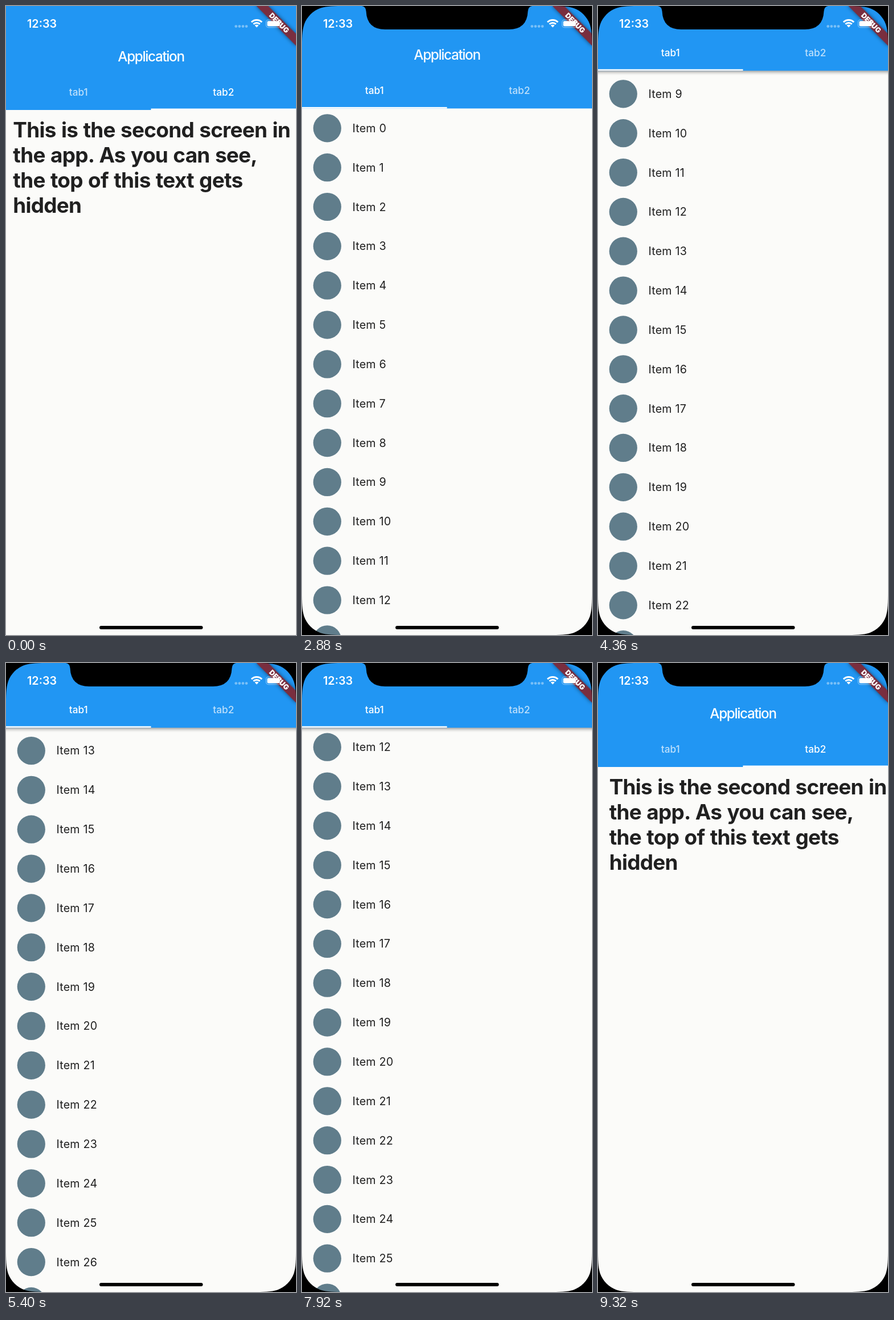
An HTML page for the animation above (9360 ms loop, 509 px wide and 1101 px high).

```html
<!DOCTYPE html>
<html lang="en">
<head>
<meta charset="utf-8">
<title>Tabbed application</title>
<style>
  html, body { margin: 0; width: 100%; height: 100%; overflow: hidden; background: #fbfbf9; }
  svg { display: block; width: 100%; height: 100%; }
  text { font-family: Inter, "Noto Sans", sans-serif; font-optical-sizing: none; fill: #fff; }
  .mid { text-anchor: middle; }
  #list text { font-size: 19.67px; letter-spacing: .2px; fill: #202020; }
  #list circle { fill: #607d8b; }
  #article text { font-size: 36.9px; font-weight: 700; letter-spacing: -.73px; word-spacing: 1.3px; fill: #202020; }
  #title { font-size: 24.2px; font-weight: 500; letter-spacing: -1.3px; }
  .tab { font-size: 17.2px; font-weight: 500; }
  .clock { font-size: 19.8px; font-weight: 600; }
  .debug { font-size: 12.5px; font-weight: 900; }
  #shadow { filter: drop-shadow(0 2px 3px rgba(0, 0, 0, .45)); }
  .ribbon { filter: drop-shadow(0 0 3.5px rgba(0, 0, 0, .5)); }
</style>
</head>
<body>
<svg viewBox="0 0 509 1101" preserveAspectRatio="none">
  <rect width="509" height="1101" fill="#fbfbf9"/>
  <g id="list"></g>
  <g id="article"></g>

  <g id="header">
    <rect id="shadow" x="-20" y="-100" width="549" height="282" fill="#2196f3"/>
    <rect y="-100" width="509" height="282" fill="#2196f3"/>
    <text id="title" class="mid" x="254.5" y="97">Application</text>
    <text class="tab mid" x="127.2" y="156.5">tab1</text>
    <text class="tab mid" x="381.8" y="156.5">tab2</text>
    <rect id="indicator" y="179.5" width="254.5" height="2.5" fill="#fff"/>
  </g>

  <g transform="translate(509 0) rotate(45)">
    <rect class="ribbon" x="-49.2" y="34.4" width="98.4" height="14.8" fill="#792e3f"/>
    <text class="debug mid" y="46.3">DEBUG</text>
  </g>

  <g id="status" fill="#fff">
    <text class="clock" x="37" y="38">12:33</text>
    <g opacity=".4">
      <circle cx="403.7" cy="35.6" r="2.4"/><circle cx="409.8" cy="35.6" r="2.4"/>
      <circle cx="415.9" cy="35.6" r="2.4"/><circle cx="422" cy="35.6" r="2.4"/>
      <rect x="456.5" y="24.2" width="27" height="13.4" rx="4" fill="none" stroke="#fff" stroke-width="1.2"/>
      <path d="M485 29q2.5 2 0 4.5z"/>
    </g>
    <path d="M430.8 28.3a13 13 0 0 1 18.4 0M434.3 31.8a8 8 0 0 1 11.4 0" fill="none" stroke="#fff" stroke-width="3"/>
    <path d="M440 37.5l-3.4-3.4a4.8 4.8 0 0 1 6.8 0z"/>
    <rect x="458.5" y="26.2" width="22" height="9.4" rx="2.3"/>
  </g>

  <rect x="164" y="1085" width="181.5" height="6" rx="3"/>
  <g id="bezel">
    <path d="M105 0Q112 1 112.5 9Q114 41 146 41H363Q395 41 396.5 9Q397 1 404 0z"/>
    <path id="corner" d="M0 0V78C0 55.5 0 44.3 3.8 32.2C8.6 19 19 8.6 32.2 3.8C44.3 0 55.5 0 78 0z"/>
    <use href="#corner" transform="translate(509 0) scale(-1 1)"/>
    <use href="#corner" transform="translate(0 1101) scale(1 -1)"/>
    <use href="#corner" transform="translate(509 1101) scale(-1 -1)"/>
  </g>
</svg>
<script>
const LOOP = 9360, STEP = 40, WIDTH = 509;
const ROW = 68.85;       // list row height, also the collapsible part of the header
const HEADER = 182;
const $ = id => document.getElementById(id);
const tabs = document.querySelectorAll('.tab');

$('list').innerHTML = Array.from({ length: 40 }, (_, i) => {
  const y = HEADER + ROW * (i + .5);
  return `<circle cx="44.3" cy="${y}" r="24.6"/><text x="88.5" y="${y + 7}">Item ${i}</text>`;
}).join('');

$('article').innerHTML = [
  'This is the second screen in',
  'the app. As you can see,',
  'the top of this text gets',
  'hidden'
].map((line, i) => `<text x="12.3" y="${230.2 + 44.05 * i}">${line}</text>`).join('');

// [time, list scroll]; negative values are overscroll
const scrollKeys = [
  [0, 0], [2860, 0], [3160, 206], [3520, 206], [3760, 560], [4290, 560], [4480, 958],
  [7850, 958], [8320, -85.5], [8760, 0], [LOOP, 0]
];
// [start time, tab selected]
const tabTaps = [[1920, 0], [5400, 1], [7200, 0], [9027, 1]];
const TAB_TIME = 300;
const PAGE_LAG = 40;     // pages start sliding just after the indicator

const clamp = v => Math.min(1, Math.max(0, v));
const smooth = u => u * u * (3 - 2 * u);

// cubic-bezier(.25, .1, .25, 1)
function ease(x) {
  if (x <= 0 || x >= 1) return clamp(x);
  const bezier = (a, b, s) => 3 * (1 - s) ** 2 * s * a + 3 * (1 - s) * s * s * b + s ** 3;
  let low = 0, high = 1;
  for (let i = 0; i < 24; i++) {
    const s = (low + high) / 2;
    if (bezier(.25, .25, s) < x) low = s; else high = s;
  }
  return bezier(.1, 1, low);
}

function scrollAt(t) {
  const i = scrollKeys.findIndex(key => key[0] > t);
  const [t0, from] = scrollKeys[i - 1], [t1, to] = scrollKeys[i];
  return from + (to - from) * smooth((t - t0) / (t1 - t0));
}

function tabAt(t) {
  return tabTaps.reduce((tab, [start, to]) => tab + (to - tab) * ease((t - start) / TAB_TIME), 1);
}

function move(id, x, y) {
  $(id).setAttribute('transform', `translate(${x} ${y})`);
}

function draw(t) {
  const scroll = scrollAt(t), tab = tabAt(t), page = tabAt(t - PAGE_LAG);
  const collapsed = clamp(scroll / ROW);

  move('list', -WIDTH * page, -scroll);
  move('article', WIDTH * (1 - page), -HEADER * collapsed);
  move('header', 0, -ROW * collapsed);
  move('indicator', WIDTH / 2 * tab, 0);
  $('title').style.opacity = 1 - collapsed;
  $('shadow').style.opacity = scroll > ROW ? 1 : 0;
  tabs[0].style.opacity = 1 - .3 * tab;
  tabs[1].style.opacity = .7 + .3 * tab;
  $('bezel').style.display = t < 1960 ? 'none' : '';
}

const begin = performance.now();
function frame() {
  const t = (performance.now() - begin) % LOOP;
  draw(Math.floor(t / STEP) * STEP);
  requestAnimationFrame(frame);
}
frame();
</script>
</body>
</html>
```
